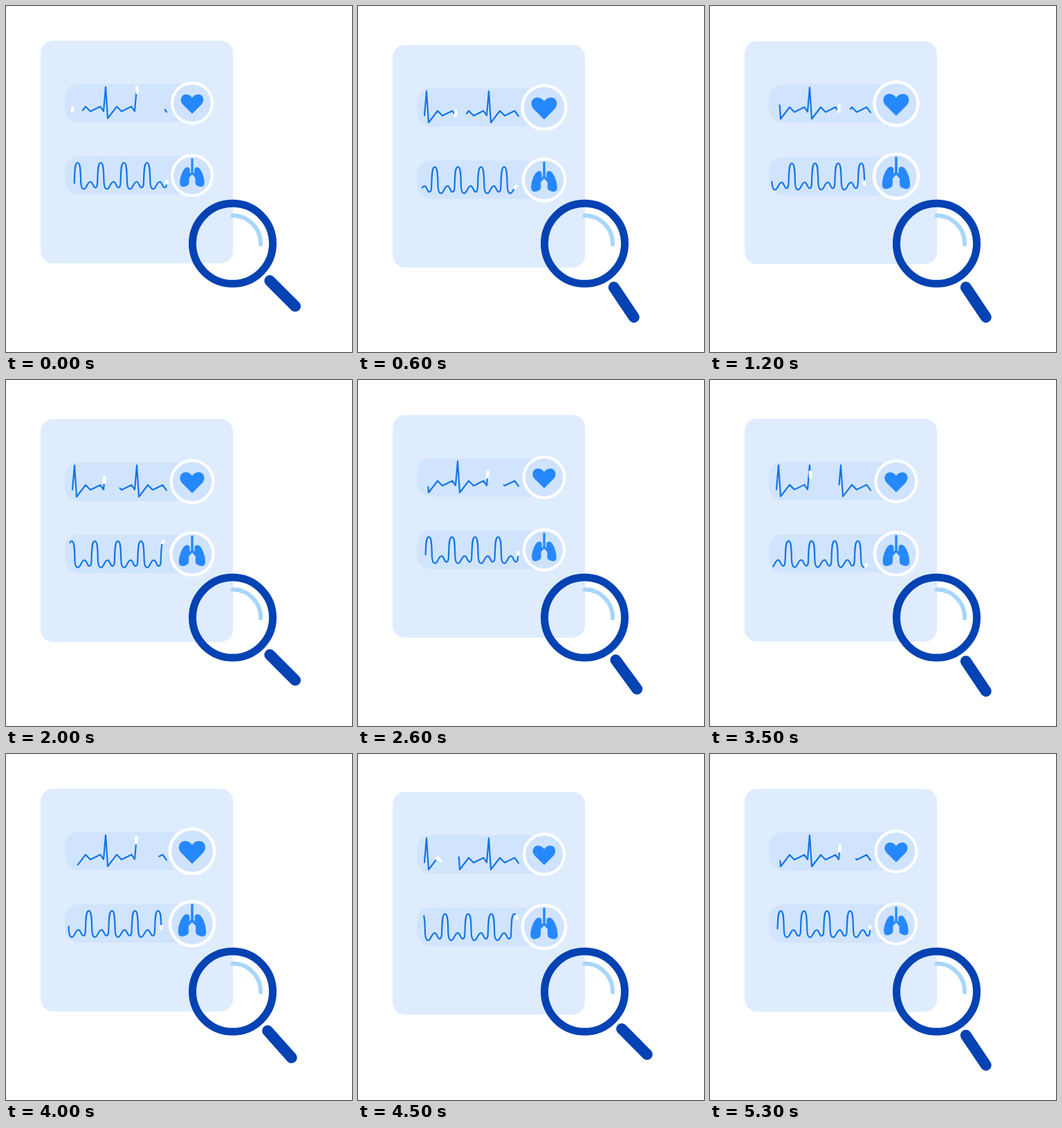
These frames come from a looping animation (500x500 px, 5400 ms). An HTML page:

```html
<!DOCTYPE html>
<html lang="en">
<head>
<meta charset="utf-8">
<title>Health report check</title>
<style>
  html, body { margin: 0; width: 100%; height: 100%; overflow: hidden; background: #fff; }
  svg { display: block; width: 100vw; height: 100vh; }
  .pill { fill: #d1e4fd; }
  .badge { fill: #cfe3fe; stroke: #fff; stroke-width: 4.2; }
  .icon { fill: #2688ff; }
  .stem { fill: none; stroke: #2688ff; stroke-width: 3.2; stroke-linecap: round; stroke-linejoin: round; }
  .trace { fill: none; stroke: #1275e6; stroke-width: 2.2; stroke-linecap: round; stroke-linejoin: round; }
  .tip { fill: none; stroke: #fff; stroke-width: 4.4; stroke-linecap: round; stroke-linejoin: round; }
  .lens { fill: none; stroke: #0542b3; }
</style>
</head>
<body>
<svg viewBox="0 0 500 500">
  <g id="card">
    <rect x="50" y="50" width="278" height="322" rx="18" fill="#deecfe"/>
    <rect class="pill" x="85" y="112.5" width="184" height="55.5" rx="20"/>
    <rect class="pill" x="85" y="217" width="184" height="55.5" rx="20"/>

    <path id="pulse" class="trace"/>
    <path id="pulseTip" class="tip"/>
    <g id="breath">
      <path id="air" class="trace"/>
      <path id="airTip" class="tip"/>
    </g>

    <g transform="translate(269 140.3)">
      <g id="heartRing"><circle class="badge" r="29"/></g>
      <path id="heart" class="icon" d="M0 15.5L-13.5 2C-19 -4.500 -15.500 -12.500 -8.800 -12.500C-4.500 -12.500 -1.500 -10 0 -7.500C1.500 -10 4.500 -12.500 8.800 -12.500C15.500 -12.500 19 -4.500 13.500 2Z"/>
    </g>
    <g transform="translate(269 245)">
      <g id="lungRing"><circle class="badge" r="29"/></g>
      <g id="lungs">
        <path class="stem" d="M0 -23.500V-5M-5 1L0 -4L5 1"/>
        <path id="lobe" class="icon" d="M-7 -12C-12.500 -12 -18 2 -17.700 11C-17.500 16 -14 17 -10 15.700L-7 14.500C-5 13.500 -4.500 12 -4.500 9V3L-3.200 1V-8C-3.200 -11 -5 -12 -7 -12Z"/>
        <use href="#lobe" transform="scale(-1 1)"/>
      </g>
    </g>
  </g>

  <g class="lens" transform="translate(327.5 343.3)">
    <circle r="58" stroke-width="11"/>
    <path d="M0 -40.500A40.500 40.500 0 0 1 40.500 1" stroke="#a8d6fb" stroke-width="6" stroke-linecap="round"/>
    <path id="handle" d="M76 0H128" stroke-width="16" stroke-linecap="round"/>
  </g>
</svg>
<script>
  const $ = id => document.getElementById(id);
  const LOOP = 5400, STEP = 100, CYCLE = 2700;
  const BEAT = 45, WAVE = 33.4;
  const DASH = 212, GAP = 98;

  // Heartbeat: three equal beats
  let d = 'M96 152';
  for (let i = 0; i < 3; i++) {
    const x = i * BEAT;
    d += [[99, 117], [102, 162.3], [115, 145.3], [122, 152.3], [136.3, 145.3]]
      .map(([px, py]) => `L${px + x} ${py}`).join('');
    d += i < 2 ? `L${141 + x} 152` : 'L232 153';
  }
  $('pulse').setAttribute('d', d);
  $('pulseTip').setAttribute('d', d);

  // Breathing: repeated waves, measured in waves through pathLength
  const WAVES = 7;
  d = `M${98.7 - 2 * WAVE} 256`;
  for (let i = 0; i < WAVES; i++) {
    d += 'c.6 -16 .4 -29.500 4.800 -29.500c4.400 0 4.200 13.500 4.600 27.500'
      + 'c.3 7 1.900 10.500 4.400 10.500c4 0 5 -10.500 9.500 -10.500'
      + 'c3.500 0 4 8.500 7 8.500c2 0 2.900 -2.500 3.100 -6.500';
  }
  for (const id of ['air', 'airTip']) {
    $(id).setAttribute('d', d);
    $(id).setAttribute('pathLength', WAVES);
  }

  const wave = (t, period) => (1 - Math.cos(2 * Math.PI * t / period)) / 2;

  // Handle swings: [start, end, from, to] in ms and degrees
  const swings = [
    [0, 600, 45, 56.2], [1230, 1850, 56.2, 45],
    [2150, 2800, 45, 56.2], [3600, 4230, 56.2, 45],
    [4446, 5096, 45, 56.2]
  ];
  function handleAngle(t) {
    let angle = 45;
    for (const [start, end, from, to] of swings) {
      if (t < start) break;
      const p = Math.min(1, (t - start) / (end - start));
      angle = from + (to - from) * wave(p, 2);
    }
    return angle;
  }

  function dash(id, pattern, start) {
    $(id).style.strokeDasharray = pattern;
    $(id).style.strokeDashoffset = -start;
  }

  const move = (id, value) => $(id).setAttribute('transform', value);

  function draw(t) {
    move('card', `translate(0 ${6.5 * wave(t - 15, CYCLE / 2)})`);

    const head = 307 + t * (DASH + GAP) * 2 / CYCLE;
    const lead = head % (DASH + GAP);
    dash('pulse', `${DASH} ${GAP}`, head - DASH);
    dash('pulseTip', `8 ${DASH + GAP - 8}`, lead);

    const p = t % CYCLE / CYCLE;
    move('breath', `translate(${WAVE * p} 0)`);
    dash('air', '4 20', 2 - p);
    dash('airTip', '.03 20', 6 - p);

    const beat = wave(t, CYCLE / 3), lung = wave(t, CYCLE);
    move('heartRing', `scale(${1 + 0.115 * beat})`);
    move('heart', `scale(${1 + 0.18 * beat})`);
    move('lungRing', `scale(${1 + 0.105 * lung})`);
    move('lungs', `scale(${1 + 0.14 * lung})`);

    move('handle', `rotate(${handleAngle(t)})`);
  }

  const begin = performance.now();
  function tick() {
    const t = (performance.now() - begin) % LOOP;
    draw(Math.floor(t / STEP) * STEP);
    requestAnimationFrame(tick);
  }
  tick();
</script>
</body>
</html>
```
